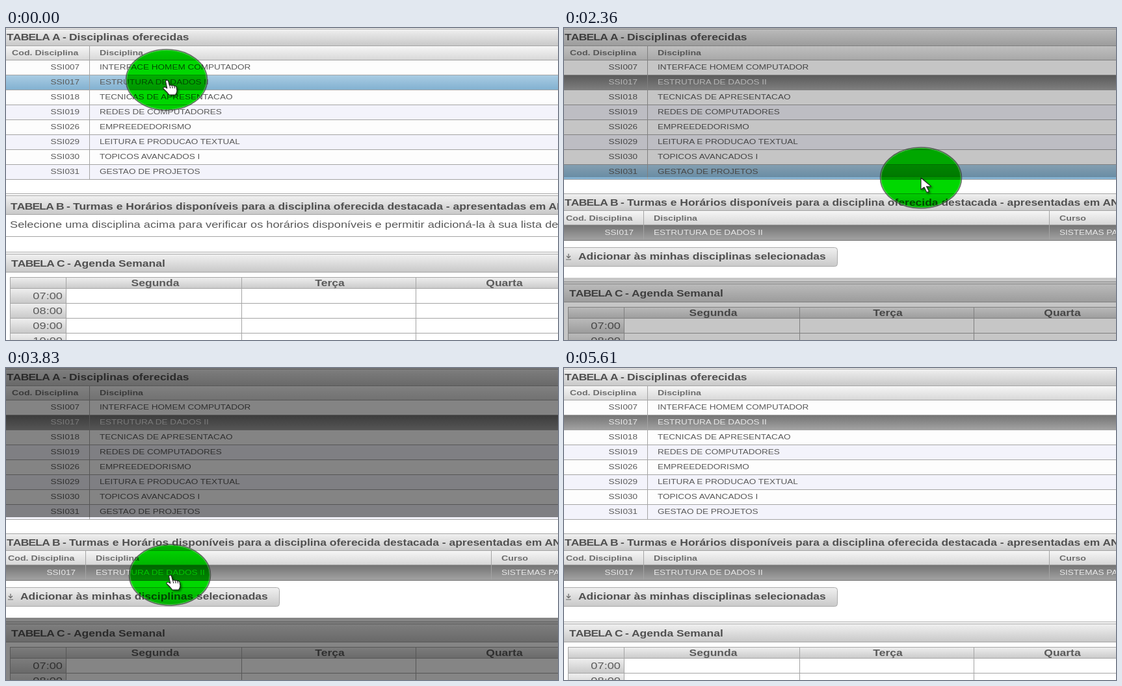
An HTML page for the animation above (5740 ms loop, 849 by 481 pixels).

```html
<!DOCTYPE html>
<html lang="pt">
<head>
<meta charset="utf-8">
<title>Disciplinas oferecidas</title>
<style>
  html, body { margin: 0; width: 100%; height: 100%; overflow: hidden; background: #fff; }
  svg { display: block; width: 100vw; height: 100vh; isolation: isolate; }
  text { font-family: "Liberation Sans", Arial, sans-serif; fill: #5a5a5a; white-space: pre; }
  rect { shape-rendering: crispEdges; }
  .title { font-size: 14px; font-weight: bold; fill: #505050; }
  .tight { letter-spacing: -.65px; font-kerning: none; }
  .head { font-size: 11.35px; font-weight: bold; fill: #6c6c6c; }
  .cell { font-size: 10.85px; }
  .note { font-size: 14.6px; }
  .day { font-size: 14px; font-weight: bold; }
  .end { text-anchor: end; }
  .mid { text-anchor: middle; }
  .picked text { fill: #e8e8e8; }
  .picked .back { fill: url(#dark); }
  .hover .back { fill: url(#blue); }
  #spot { fill: #00d800; mix-blend-mode: multiply; }
  #pointer path { stroke: #222; stroke-width: 1.1; stroke-linejoin: round; fill: #fff; }
  #pointer { filter: drop-shadow(2px 2px 1.5px rgba(0, 0, 0, .5)); }
</style>
</head>
<body>
<svg viewBox="0 0 849 481" preserveAspectRatio="none">
  <defs>
    <linearGradient id="bar" x2="0" y2="1"><stop stop-color="#f0f0f0"/><stop offset="1" stop-color="#c9c9c9"/></linearGradient>
    <linearGradient id="soft" x2="0" y2="1"><stop stop-color="#f6f6f6"/><stop offset="1" stop-color="#d8d8d8"/></linearGradient>
    <linearGradient id="dark" x2="0" y2="1"><stop stop-color="#747474"/><stop offset="1" stop-color="#a2a2a2"/></linearGradient>
    <linearGradient id="blue" x2="0" y2="1"><stop stop-color="#a9cce3"/><stop offset="1" stop-color="#82b1d1"/></linearGradient>
  </defs>
  <g id="page"></g>
  <g id="dim"><rect width="849" height="230"/><rect y="385" width="849" height="96"/></g>
  <g id="halo">
    <ellipse id="spot" rx="62" ry="46.5"/>
    <ellipse rx="62.5" ry="47" fill="none" stroke="#383c38" stroke-opacity=".7" stroke-width="1.6"/>
    <ellipse rx="61.3" ry="45.8" fill="none" stroke="#d8f0d8" stroke-opacity=".45" stroke-width=".8"/>
  </g>
  <g id="pointer">
    <path id="arrow" d="M0 0V18L5 14.5 9 22.5 12.5 21 8.5 13.2H15.5Z"/>
    <g id="hand">
      <path d="M-1.5 2Q0-1 2.5 1.5L4.5 9Q6 7 8 9 10 7.500 11.500 9.500 14 8.500 15 11L16 17Q15.500 20 13.500 23H4Q1 19-5 13.500-5.500 11-2.500 11L.8 13Z"/>
      <path d="M5 9.500L5.800 13M8.500 9.500L9.200 13M12 10L12.500 13" fill="none"/>
    </g>
  </g>
</svg>
<script>
const $ = id => document.getElementById(id);
const LOOP = 5740, CLICK = 850, ROW_TOP = 49, ROW = 23;

const text = (x, y, s, cls) =>
  `<text class="${cls}" transform="translate(${x} ${y}) scale(1.25 1)">${s}</text>`;
const box = (x, y, w, h, fill, cls = '') =>
  `<rect x="${x}" y="${y}" width="${w}" height="${h}" fill="${fill}" class="${cls}"/>`;
const hline = (y, x = 0, color = '#a4a4a4') => box(x, y, 849, 1, color);
const vline = (x, y, h, color = '#a4a4a4') => box(x, y, 1, h, color);
const title = (x, y, letter, rest) =>
  text(x, y, `TABELA ${letter} -`, 'title tight') + text(x + 96, y, rest, 'title');
const bar = (y, h, fill = 'url(#bar)') => box(0, y, 849, h, fill) + hline(y + h);

const courses = [
  ['007', 'INTERFACE HOMEM COMPUTADOR'], ['017', 'ESTRUTURA DE DADOS II'],
  ['018', 'TECNICAS DE APRESENTACAO'], ['019', 'REDES DE COMPUTADORES'],
  ['026', 'EMPREEDEDORISMO'], ['029', 'LEITURA E PRODUCAO TEXTUAL'],
  ['030', 'TOPICOS AVANCADOS I'], ['031', 'GESTAO DE PROJETOS']
];

function courseRow([code, name], i) {
  const y = ROW_TOP + ROW * i, fill = i > 2 && i % 2 ? '#f3f3fb' : '#fdfdfd';
  return `<g class="row">${box(0, y + 1, 849, ROW - 1, fill, 'back')}${vline(128, y, ROW)}` +
    hline(y + ROW) + text(113, y + 15, 'SSI' + code, 'cell end') +
    text(144, y + 15, name, 'cell') + '</g>';
}

const tableA = hline(1) + bar(2, 25) + title(1, 19, 'A', 'Disciplinas oferecidas') +
  bar(28, 21, 'url(#soft)') + vline(128, 28, 21) +
  text(9, 42, 'Cod. Disciplina', 'head') + text(144, 42, 'Disciplina', 'head') +
  courses.map(courseRow).join('') + hline(255);

const titleB = 'Turmas e Horários disponíveis para a disciplina oferecida destacada - apresentadas em AN';

const emptyB = hline(258) + bar(259, 28) + title(7, 280, 'B', titleB) +
  text(6, 308, 'Selecione uma disciplina acima para verificar os horários disponíveis e permitir adicioná-la à sua lista de', 'note') +
  hline(321);

const filledB = bar(256, 25) + title(1, 274, 'B', titleB) +
  bar(282, 21, 'url(#soft)') + vline(122, 282, 22) + vline(746, 282, 22) +
  text(3, 297, 'Cod. Disciplina', 'head') + text(138, 297, 'Disciplina', 'head') +
  text(762, 297, 'Curso', 'head') +
  '<g class="picked">' + box(0, 304, 849, 23, '', 'back') + hline(327, 0, '#777') +
  vline(122, 304, 23) + vline(746, 304, 23) +
  text(107, 319, 'SSI017', 'cell end') + text(138, 319, 'ESTRUTURA DE DADOS II', 'cell') +
  text(762, 319, 'SISTEMAS PARA INTERNET', 'cell') + '</g>' +
  '<rect x="-9.500" y="338.500" width="430" height="29" rx="4" fill="url(#bar)" stroke="#aaa" style="shape-rendering:auto"/>' +
  '<path d="M7 348V354M4 351.500L7 354.500 10 351.500M3 357H11" fill="none" stroke="#666" stroke-width="1.200"/>' +
  text(22, 357, 'Adicionar às minhas disciplinas selecionadas', 'title');

const hours = ['07:00', '08:00', '09:00', '10:00'];
const tableC = hline(345) + hline(348) + bar(349, 27) + title(8, 368, 'C', 'Agenda Semanal') +
  box(7, 384, 849, 18, 'url(#bar)') + hline(384, 7) +
  hours.map((h, i) => {
    const y = 401 + ROW * i;
    return box(7, y, 86, ROW, 'url(#bar)') + hline(y, 7) + text(87, 418 + ROW * i, h, 'note end');
  }).join('') +
  [6, 92, 362, 630].map(x => vline(x, 384, 140)).join('') +
  ['Segunda', 'Terça', 'Quarta'].map((d, i) => text(229.500 + 268.500 * i, 398, d, 'day mid')).join('');

$('page').innerHTML = tableA + `<g id="empty">${emptyB}</g><g id="filled">${filledB}</g>` +
  `<g id="agenda">${tableC}</g>`;
const rows = [...document.querySelectorAll('.row')];

const ticks = [0, 850, 1780, 1930, 2010, 2100, 2180, 2270, 2360, 2460, 2490, 2620, 2750, 2800,
  2870, 2930, 3070, 3190, 3310, 3430, 3550, 3700, 3830, 3970, 4100, 4240, 4370, 4500, 4630,
  4750, 4860, 4970, 5090, 5200];

const path = [[0, 247, 80], [1850, 247, 80], [2010, 315, 114], [2360, 549, 231], [2750, 700, 329],
  [2930, 735, 320], [3070, 710, 319], [3550, 290, 319], [3700, 250, 319], [3830, 252, 319],
  [3970, 335, 318], [4100, 505, 313], [4240, 600, 309], [4370, 644, 307]];
const shade = [[1850, 0], [2950, .48], [4240, .48], [5200, 0]];
const haloFade = [[4240, 1], [4600, 0]];
const pointerFade = [[4700, 1], [5090, 0]];

function at(keys, t, k = 1) {
  const n = keys.findIndex(key => key[0] > t);
  if (n < 0) return keys[keys.length - 1][k];
  if (n === 0) return keys[0][k];
  const a = keys[n - 1], b = keys[n];
  return a[k] + (b[k] - a[k]) * (t - a[0]) / (b[0] - a[0]);
}

const show = (el, on) => { el.style.display = on ? '' : 'none'; };

function draw(now) {
  const time = now % LOOP;
  const t = ticks.filter(tick => tick <= time).pop();
  const x = at(path, t, 1), y = at(path, t, 2);
  const clicked = t >= CLICK;
  const over = Math.floor((y - ROW_TOP) / ROW);

  rows.forEach((row, i) => {
    const picked = clicked && i === 1;
    row.classList.toggle('picked', picked);
    row.classList.toggle('hover', !picked && i === over);
  });
  show($('empty'), !clicked);
  show($('filled'), clicked);
  $('agenda').setAttribute('transform', `translate(0 ${clicked ? 46 : 0})`);

  $('dim').style.opacity = at(shade, t);
  const glow = at(haloFade, t);
  for (const ring of $('halo').children) {
    ring.setAttribute('transform', `translate(${x} ${y})`);
    ring.style.opacity = glow;
  }
  const link = (y > ROW_TOP && y < 229) || (y > 304 && y < 327);
  show($('hand'), link);
  show($('arrow'), !link);
  $('pointer').setAttribute('transform', `translate(${x} ${y})`);
  $('pointer').style.opacity = at(pointerFade, t);
}

const start = performance.now();
function tick() {
  draw(Math.max(0, performance.now() - start));
  requestAnimationFrame(tick);
}
tick();
</script>
</body>
</html>
```
